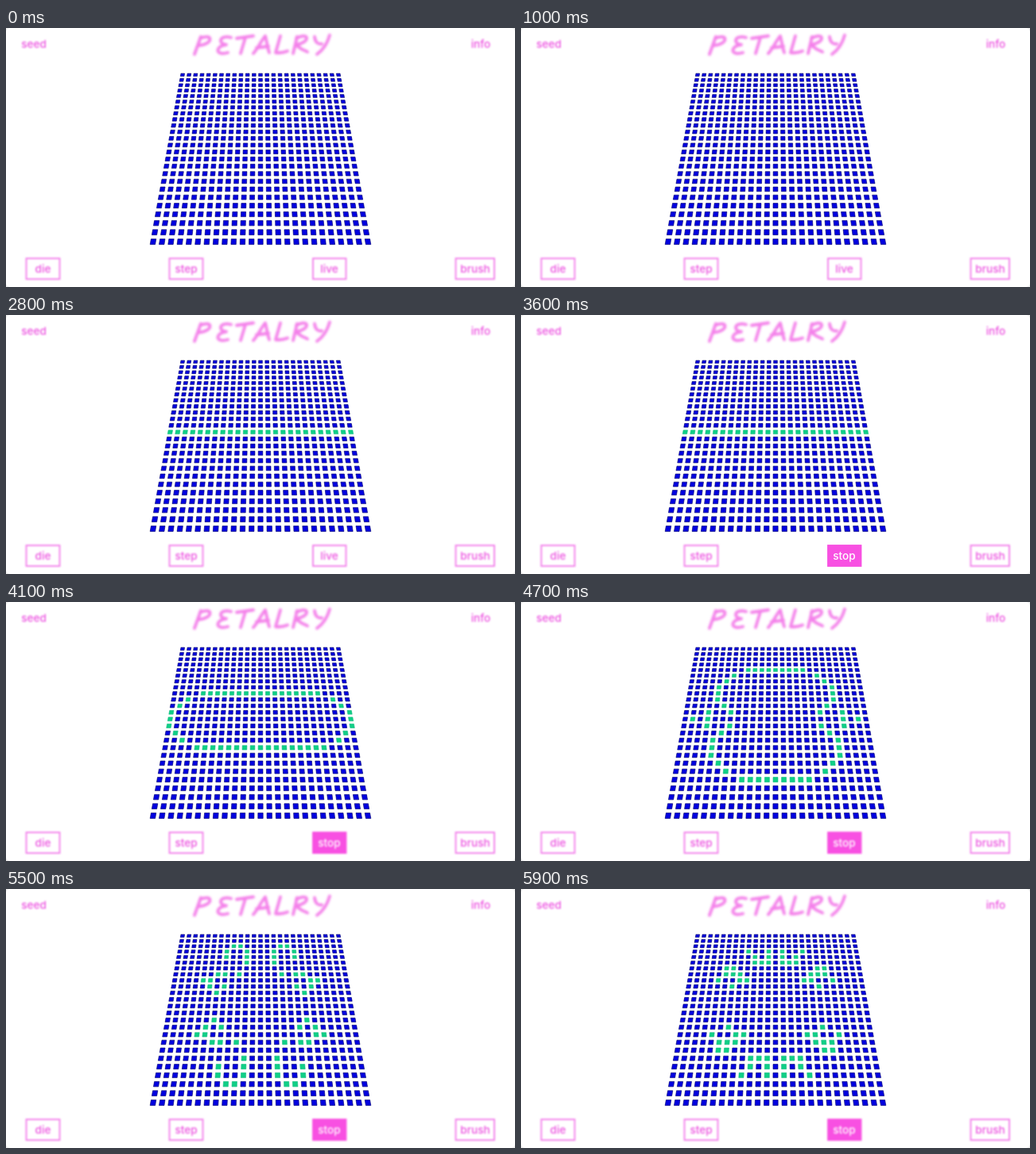
Animation, 640 px wide and 326 px high, one loop 6000 ms. Source, as an HTML page:

```html
<!DOCTYPE html>
<html lang="en">
<head>
<meta charset="utf-8">
<title>Petalry</title>
<style>
  html, body { margin: 0; width: 100%; height: 100%; overflow: hidden; background: #eee; }
  svg { display: block; width: 100vw; height: 100vh; }
  .cell { fill: #0000e0; stroke: #000068; stroke-width: .6; }
  .cell.on { fill: #10cf86; stroke: #14bc80; }
  .title { fill: none; stroke: #f480ea; stroke-width: 3.8; stroke-linecap: round; stroke-linejoin: round; filter: blur(1.4px); }
  .ui { filter: blur(.9px); }
  .ui text { font: 500 13.6px Inter, "Liberation Sans", sans-serif; text-anchor: middle; fill: #ec52e0; }
  .ui rect { fill: #fff; stroke: #f27cea; stroke-width: 1.8; }
  .ui.hover { filter: none; }
  .ui.hover text { fill: #b850ac; font-weight: 400; }
  .ui.active rect { fill: #f850e2; stroke: #f850e2; }
  .ui.active text { fill: #fff; font-weight: 500; }
  .hidden { visibility: hidden; }
</style>
</head>
<body>
<svg viewBox="0 0 640 326">
  <rect width="640" height="326" rx="5" fill="#fff"/>
  <g id="grid"></g>
  <path class="title" d="M245 11L237 33M244 13C260 6 262 20 242 22
    M283 12C268 8 266 20 277 21C263 22 262 36 279 31
    M290 13L311 10M301 12L295 32
    M311 32C318 24 322 14 326 10C328 18 329 25 331 31M315 25L330 23
    M345 10L339 31Q347 32 354 29
    M366 11L361 32M365 13C382 4 383 19 364 21Q371 27 379 30
    M388 11Q389 21 397 20M407 9C404 20 398 28 391 33"/>
  <g id="ui"></g>
</svg>
<script>
const NS = 'http://www.w3.org/2000/svg';
const LOOP = 6000, TICK = 100;
const SIZE = 25, MID = 12, HALF = 0.285;
const OPENED = 1600, SEEDED = 2400, CLOSED = 2500, STARTED = 3522, STEP = 135;

function add(parent, name, attrs) {
  const el = document.createElementNS(NS, name);
  for (const key in attrs) el.setAttribute(key, attrs[key]);
  return parent.appendChild(el);
}

// Perspective: grid column and row to stage coordinates.
function project(col, row) {
  const scale = 8.17 / (1 - 0.011407 * row);
  const x = 320 + (col - MID) * scale;
  const y = 59 + (scale - 8.17) / 0.01467;
  return x.toFixed(2) + ',' + y.toFixed(2);
}

const grid = document.getElementById('grid');
const cells = [];
for (let r = 0; r < SIZE; r++) {
  for (let c = 0; c < SIZE; c++) {
    const points = [[-HALF, -HALF], [HALF, -HALF], [HALF, HALF], [-HALF, HALF]]
      .map(([dx, dy]) => project(c + dx, r + dy)).join(' ');
    cells.push(add(grid, 'polygon', { class: 'cell', points }));
  }
}

// Conway's rules with dead cells beyond the border.
function evolve(world) {
  return world.map((alive, i) => {
    const r = Math.floor(i / SIZE), c = i % SIZE;
    let n = 0;
    for (let y = Math.max(0, r - 1); y <= Math.min(SIZE - 1, r + 1); y++)
      for (let x = Math.max(0, c - 1); x <= Math.min(SIZE - 1, c + 1); x++)
        if (y !== r || x !== c) n += world[y * SIZE + x];
    return +(n === 3 || (alive && n === 2));
  });
}

const empty = Array(SIZE * SIZE).fill(0);
const worlds = [empty.map((_, i) => +(Math.floor(i / SIZE) === MID))];
while (worlds.length < 20) worlds.push(evolve(worlds[worlds.length - 1]));

const ui = document.getElementById('ui');
function control(label, x, y, box) {
  const g = add(ui, 'g', { class: 'ui' });
  if (box) add(g, 'rect', { x: box[0], y: box[1], width: box[2], height: 26 });
  const text = add(g, 'text', { x, y });
  text.textContent = label;
  return { g, text };
}

const seed = control('seed', 35, 25.2);
control('info', 597, 25.2);
const acorn = control('acorn', 40, 58.5, [19, 41, 42]);
const line = control('line', 40, 92.5, [19, 75, 42]);
control('die', 46.5, 307.5, [25.5, 290, 42]);
control('step', 226.5, 307.5, [205.5, 290, 42]);
const live = control('live', 406.5, 307.5, [386, 290, 41.5]);
control('brush', 590, 307.5, [565.5, 290, 48.5]);

const between = (t, from, to) => t >= from && t < to;

function draw(t) {
  const open = between(t, OPENED, CLOSED);
  const running = t >= STARTED;
  seed.g.classList.toggle('hover', between(t, OPENED, 2200));
  acorn.g.classList.toggle('hidden', !open);
  line.g.classList.toggle('hidden', !open);
  line.g.classList.toggle('hover', between(t, 2300, CLOSED));
  live.g.classList.toggle('hover', between(t, 3100, 3800));
  live.g.classList.toggle('active', running);
  live.text.textContent = running ? 'stop' : 'live';

  const gen = Math.max(0, Math.floor((t - STARTED) / STEP));
  const world = t < SEEDED ? empty : worlds[gen];
  cells.forEach((cell, i) => cell.classList.toggle('on', world[i] === 1));
}

const start = performance.now();
let last = -1;
function frame() {
  const elapsed = (performance.now() - start) % LOOP;
  const t = Math.floor(elapsed / TICK) * TICK;
  if (t !== last) draw(last = t);
  requestAnimationFrame(frame);
}
frame();
</script>
</body>
</html>
```
